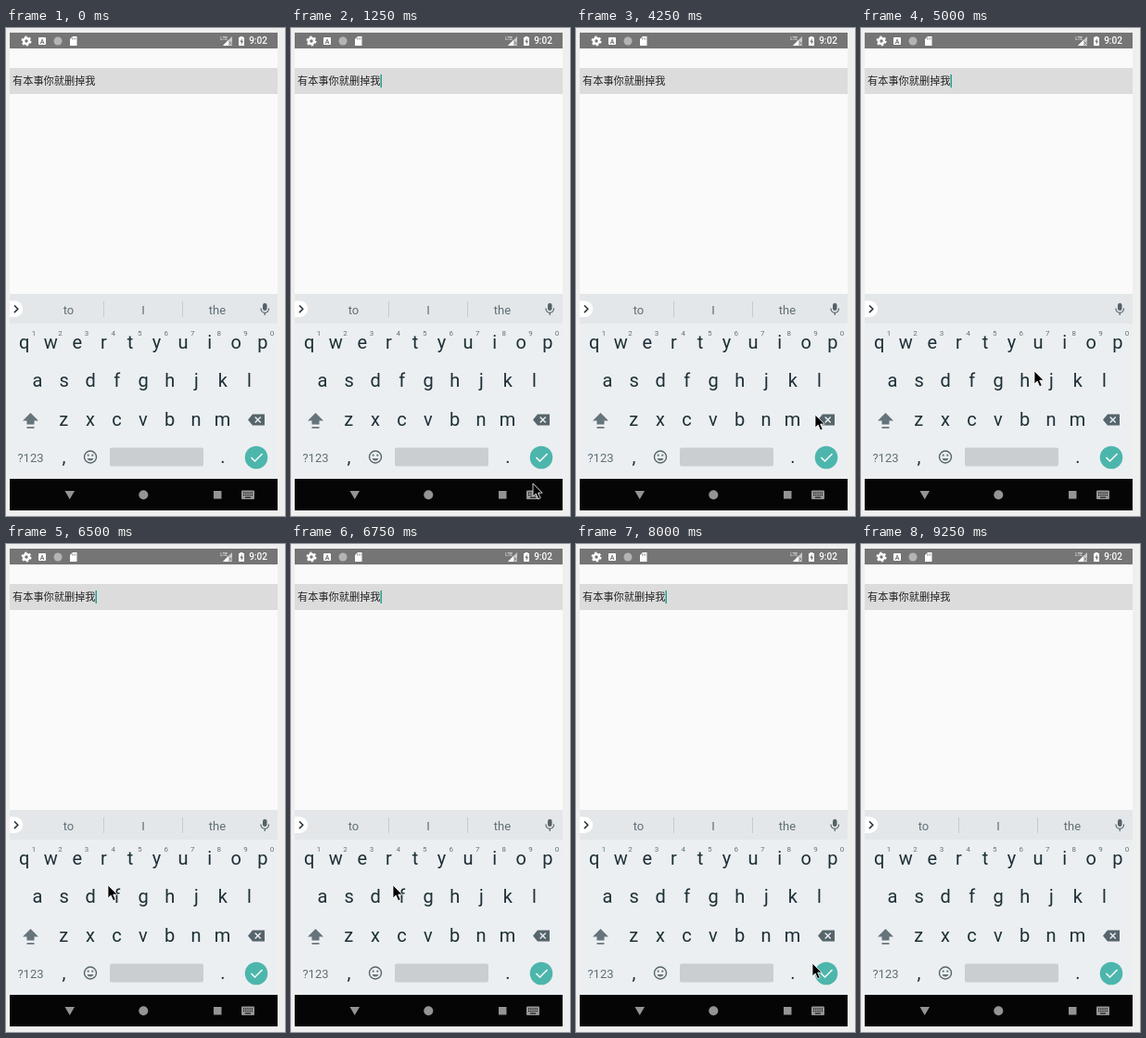
Write an HTML page that moves like this. It is 301 by 525 pixels and loops after 9750 ms.

```html
<!DOCTYPE html>
<html lang="zh">
<head>
<meta charset="utf-8">
<style>
html, body { margin: 0; width: 100%; height: 100%; overflow: hidden; background: #efeff0; }
svg { display: block; width: 301px; height: 525px; }
text { font-family: Roboto, "Noto Sans CJK SC", "Noto Sans CJK", sans-serif; text-anchor: middle; }
.key { font-size: 20px; fill: #1d3037; }
.num { font-size: 8px; fill: #637077; }
.word { font-size: 13px; fill: #5f6e76; }
.line { fill: none; stroke-linecap: square; }
</style>
</head>
<body>
<svg viewBox="0 0 301 525">
  <rect x="4" y="5" width="289" height="514" fill="#fafafa"/>
  <rect x="4" y="5" width="289" height="17" fill="#757575"/>
  <rect x="4" y="43" width="289" height="28" fill="#dcdcdc"/>
  <rect x="4" y="286" width="289" height="32" fill="#e4e7e9"/>
  <rect x="4" y="318" width="289" height="167" fill="#eceff1"/>
  <rect x="4" y="485" width="289" height="34" fill="#050505"/>

  <!-- status bar -->
  <g fill="#fff">
    <circle cx="22" cy="14" r="3" fill="none" stroke="#fff" stroke-width="2.6"/>
    <circle cx="22" cy="14" r="4.7" fill="none" stroke="#fff" stroke-width="1.6" stroke-dasharray="2.4 2.52"/>
    <rect x="35" y="10" width="8" height="8" rx="1"/>
    <text x="39" y="16.7" font-size="7" font-weight="700" fill="#757575">A</text>
    <circle cx="56" cy="14" r="4.5" fill="#b4b4b4"/>
    <path d="M69 12l3-3h4.5v10H69z"/>
    <path d="M71.5 10.5v2m1.7-2v2m1.7-2v2" stroke="#757575" stroke-width=".7"/>
    <text x="235.3" y="12.5" font-size="5">LTE</text>
    <path d="M244 9v10h-10z" fill="#c9c9c9"/>
    <path d="M240 13v6h-6z"/>
    <path d="M240.500 14.500l3.500 3.500m0-3.500l-3.500 3.500" stroke="#757575" stroke-width=".8"/>
    <path d="M251 10h1.500V9h3v1H257v9h-6z"/>
    <path d="M254.700 11l-2.200 4h1.300v3l2.200-4h-1.300z" fill="#757575"/>
    <text x="272" y="17.300" font-size="10" font-weight="500">9:02</text>
  </g>

  <text x="7" y="60.500" font-size="11.200" fill="#222" style="text-anchor:start">有本事你就删掉我</text>
  <rect id="caret" x="96.500" y="50" width="1.500" height="14" fill="#269f95"/>

  <!-- suggestion bar -->
  <path d="M4 293.500h5.500a8.700 8.700 0 0 1 0 17.400H4z" fill="#fff"/>
  <path class="line" d="M9.500 299l3.300 3.300-3.300 3.300" stroke="#263238" stroke-width="1.500"/>
  <g id="words">
    <path d="M105.500 294v17M190.500 294v17" stroke="#c5cbce"/>
    <text class="word" x="67.500" y="307.500">to</text>
    <text class="word" x="148" y="307.500">I</text>
    <text class="word" x="228" y="307.500">the</text>
  </g>
  <rect x="277" y="296" width="4.500" height="8" rx="2.250" fill="#546168"/>
  <path class="line" d="M275 302a4.250 4.250 0 0 0 8.500 0M279.250 306.500v2" stroke="#546168" stroke-width="1.200"/>

  <g id="keys"></g>

  <!-- special keys -->
  <g fill="#66747b">
    <path d="M26.500 414l8.500 8.500h-4.500v4h-8v-4H18z"/>
    <rect x="22.500" y="429" width="8" height="1.700"/>
    <path d="M266 415.500h13v12h-13l-5-6z" fill="#56656c"/>
    <path d="M268.700 418.500l6 6m0-6l-6 6" stroke="#eceff1" stroke-width="1.400"/>
    <text class="word" x="26.500" y="466.500">?123</text>
    <circle cx="91" cy="461.500" r="6.500" fill="none" stroke="#56656c" stroke-width="1.400"/>
    <circle cx="88.700" cy="459.700" r="1.100"/>
    <circle cx="93.300" cy="459.700" r="1.100"/>
    <path d="M87.500 463h7a3.700 3.700 0 0 1-7 0z"/>
  </g>
  <rect x="112" y="451.500" width="101" height="20" rx="2" fill="#cbced0"/>
  <circle cx="270" cy="462" r="12.300" fill="#4db6ac"/>
  <path class="line" d="M265 462.500l3.500 3.500 7.500-7.500" stroke="#fff" stroke-width="1.500"/>

  <!-- navigation bar -->
  <g fill="#949494">
    <path d="M63.500 498h10.500l-5.250 9z"/>
    <circle cx="148.300" cy="502.300" r="5"/>
    <rect x="224" y="498" width="8.500" height="8.500"/>
    <rect x="254" y="497.500" width="14" height="9.500" rx="1"/>
    <path d="M256 500.200h10M256 502.500h10" stroke="#050505" stroke-width="1.200" stroke-dasharray="1.200 1"/>
    <path d="M258 505h6" stroke="#050505"/>
  </g>

  <path id="mouse" d="M0 0v14l3.200-3 2.500 5.700 2.500-1.100-2.500-5.500h4.500z" fill="#000" stroke="#fff" stroke-width=".8"/>
</svg>
<script>
const LOOP = 9750, STEP = 250;
const $ = id => document.getElementById(id);
const label = (x, y, s, cls) => `<text class="${cls}" x="${x}" y="${y}">${s}</text>`;
const row = (s, x, y, cls) => [...s].map((c, i) => label(x + i * 28.55, y, c, cls)).join("");

$("keys").innerHTML =
  row("qwertyuiop", 19.8, 345, "key") + row("1234567890", 30, 331, "num") +
  row("asdfghjkl", 34, 386, "key") + row("zxcvbnm", 62.3, 427.5, "key") +
  label(62.5, 467.5, ",", "key") + label(234, 467.5, ".", "key");

const caretOn = [[250, 750], [1250, 1750], [2500, 2750], [3250, 4250], [4750, 8250], [8750, 9250]];
// pointer: time, x, y; no position means hidden
const path = [
  [0], [1000, 261, 490], [1500, 261, 478], [2000, 269, 472], [2250, 266, 424],
  [2750, 267, 426], [4250, 258, 416], [4500, 222, 388], [4750, 192, 371], [5000, 187, 369],
  [5250, 110, 367], [7000, 111, 371], [7500, 155, 396], [7750, 222, 432],
  [8000, 255, 451], [8500]
];
const show = (el, on) => el.style.visibility = on ? "visible" : "hidden";

function draw(now) {
  const t = Math.floor(now % LOOP / STEP) * STEP;
  show($("caret"), caretOn.some(([a, b]) => t >= a && t < b));
  show($("words"), t < 5000 || t >= 5500);
  const [, x, y] = path.filter(p => p[0] <= t).pop();
  show($("mouse"), x !== undefined);
  if (x !== undefined) $("mouse").setAttribute("transform", `translate(${x} ${y})`);
}

const start = performance.now();
(function tick() {
  draw(performance.now() - start);
  requestAnimationFrame(tick);
})();
</script>
</body>
</html>
```
